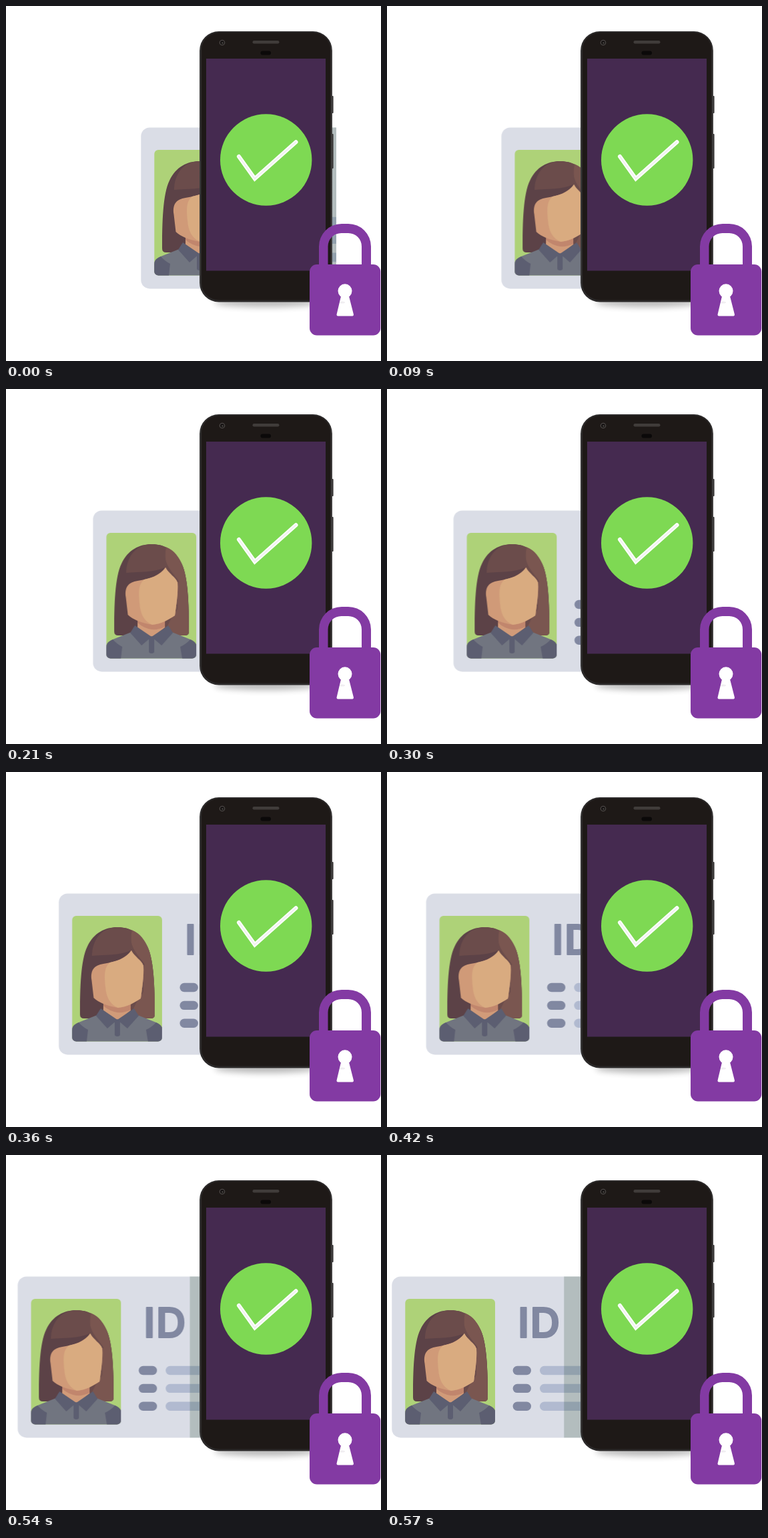
These frames come from a looping animation (562 by 533 pixels, 1340 ms). An HTML page:

```html
<!DOCTYPE html>
<html lang="en">
<head>
<meta charset="utf-8">
<title>Verified ID</title>
<style>
  html, body { margin: 0; width: 100%; height: 100%; overflow: hidden; background: #fff; }
  svg { display: block; width: 562px; height: 533px; }
  .letters { font: 600 62px Inter, "Liberation Sans", sans-serif; fill: #8188a1; stroke: #8188a1; stroke-width: 2; stroke-linejoin: round; }
</style>
</head>
<body>
<svg viewBox="0 0 562 533">
  <defs>
    <clipPath id="photo"><rect x="27.3" y="216" width="134.7" height="188.5" rx="6"/></clipPath>
    <clipPath id="cardEdge"><rect x="0" y="180" width="300" height="250"/></clipPath>
    <filter id="soft" x="-20%" y="-100%" width="140%" height="300%"><feGaussianBlur stdDeviation="5"/></filter>
    <linearGradient id="rim">
      <stop offset="0" stop-color="#444"/>
      <stop offset=".012" stop-color="#2b2929"/>
      <stop offset=".985" stop-color="#2b2929"/>
      <stop offset="1" stop-color="#4a4848"/>
    </linearGradient>
  </defs>

  <g id="card">
    <g clip-path="url(#cardEdge)">
      <rect x="7.3" y="182.4" width="330" height="242" rx="13" fill="#dadde6"/>
      <g id="rows"></g>
      <rect x="265.3" y="182.4" width="35" height="242" fill="rgb(20 60 30 / .2)"/>
    </g>
    <text class="letters" x="196" y="274">I</text>
    <text class="letters" x="214.5" y="274">D</text>

    <g clip-path="url(#photo)">
      <rect x="27" y="216" width="136" height="189" fill="#aed278"/>
      <!-- hair -->
      <path fill="#5c4247" d="M39 364C39 325 40 282 50 262C60 241 77 233 95 233C113 233 130 241 140 262C150 282 151 325 151 364Q151 370 145 370H45Q39 370 39 364Z"/>
      <path fill="#6b4c4b" d="M57 276C57 254 70 233 95 233C113 233 130 241 140 262C150 282 151 325 151 364Q151 370 145 370H100V300L115 268C98 276 78 274 57 276Z"/>
      <path fill="#7a5650" d="M117 237.500C129 242 137 253 142 267C150 290 151 330 151 364Q151 370 145 370H112L124 345L134 330V290C143 292 119 273 116 256Q115 246 117 237.500Z"/>
      <!-- neck and face -->
      <path fill="#d19b79" d="M74 338H115V358L95 374L74 358Z"/>
      <path fill="#c1866d" d="M74 342H115V357Q105 362 95 361Q83 359 74 351Z"/>
      <path fill="#d09a78" d="M56.500 313C54 297 61 290 74 288C93 285 107 280 116 268C120 277 132 283 134 291C135 307 132 325 130 340C121 346 109 353 96 354C82 352 66 346 59.500 339Z"/>
      <path fill="#d9ab80" d="M84 286C98 283 108 279 116 268C120 277 132 283 134 291C135 307 132 325 130 340C121 346 109 353 96 354C83 349 78 336 77 322C76 308 74 294 84 286Z"/>
      <!-- shirt -->
      <path fill="#717580" d="M27 405V388Q28 380 37 376L67 364L95 372L123 364L153 376Q161 380 162 388V405Z"/>
      <g fill="#5c5e71">
        <path d="M27 405V385Q29 379 37 376Q43 383 51 387L49 405Z"/>
        <path d="M162.500 405V385Q161 379 153 376Q147 383 138 387L141 405Z"/>
        <path d="M70 355L95 372L80 385L63 366Z"/>
        <path d="M120 355L95 372L110 385L127 366Z"/>
        <path d="M91 374L95 371L99 374V394Q99 397 95 397Q91 397 91 394Z"/>
      </g>
    </g>
  </g>

  <!-- phone -->
  <ellipse cx="390" cy="445" rx="78" ry="7" fill="#000" opacity=".28" filter="url(#soft)"/>
  <g fill="#363434">
    <rect x="486" y="135" width="4.600" height="26" rx="1"/>
    <rect x="486" y="192" width="4.600" height="52" rx="1"/>
  </g>
  <rect x="290" y="38" width="199" height="406.500" rx="29" fill="url(#rim)"/>
  <rect x="293" y="40" width="193.500" height="401.500" rx="26" fill="#1e1917"/>
  <rect x="300" y="79" width="179" height="318.500" fill="#452a50"/>
  <rect x="369.500" y="52" width="40" height="4.500" rx="2.200" fill="#403c3a"/>
  <rect x="381.500" y="67.500" width="15.500" height="6" rx="3" fill="#0b0909"/>
  <circle cx="324" cy="55" r="3.700" fill="#151212" stroke="#4b4745" stroke-width="1.300"/>
  <circle cx="324.500" cy="55.500" r="1.200" fill="#4b4745"/>
  <circle cx="389.700" cy="231" r="68.700" fill="#7ed953"/>
  <g fill="none" stroke-linecap="round">
    <path d="M349 226L372.800 259.300L434.500 204.300" stroke="#fff" stroke-width="6"/>
    <path d="M349 226L372.800 259.300L434.500 204.300" stroke="#f0f0f0" stroke-width="2"/>
  </g>

  <!-- padlock -->
  <path d="M475.500 392V368Q475.500 334 508 334Q540 334 540 368V392" fill="none" stroke="none"/>
  <path fill="#833aa3" fill-rule="evenodd" d="M469 392V361A34 34 0 0 1 503 327H513A34 34 0 0 1 547 361V392ZM482.500 392H533V361A20 20 0 0 0 513 341H502.500A20 20 0 0 0 482.500 361Z"/>
  <rect x="455" y="388" width="106.300" height="106.500" rx="11" fill="#833aa3"/>
  <circle cx="508" cy="427.800" r="10.500" fill="#fff"/>
  <path d="M504.500 434H511.500L519 463.500H497.500Z" fill="#fff" stroke="#fff" stroke-width="4" stroke-linejoin="round"/>
  <ellipse cx="504" cy="445" rx="4" ry="1.500" fill="#f0eef1"/>
</svg>
<script>
  const SVG = "http://www.w3.org/2000/svg";
  const rows = document.getElementById("rows");

  function pill(x, y, width, fill) {
    const rect = document.createElementNS(SVG, "rect");
    const attrs = { x, y, width, height: 13.4, rx: 6.7, fill };
    for (const name in attrs) rect.setAttribute(name, attrs[name]);
    rows.append(rect);
  }

  for (const y of [316.8, 343.7, 370.5]) {
    pill(188.6, y, 27.4, "#8188a1");
    pill(229, y, 100, "#b1bad0");
  }

  // The card slides out in 19 even steps of 30 ms, then rests.
  const LOOP = 1340, ARRIVE = 569.9;
  document.getElementById("card").animate([
    { transform: "translateX(195px)", offset: 0, easing: "steps(19, end)" },
    { transform: "translateX(0px)", offset: ARRIVE / LOOP },
    { transform: "translateX(0px)", offset: 1 }
  ], { duration: LOOP, iterations: Infinity });
</script>
</body>
</html>
```
